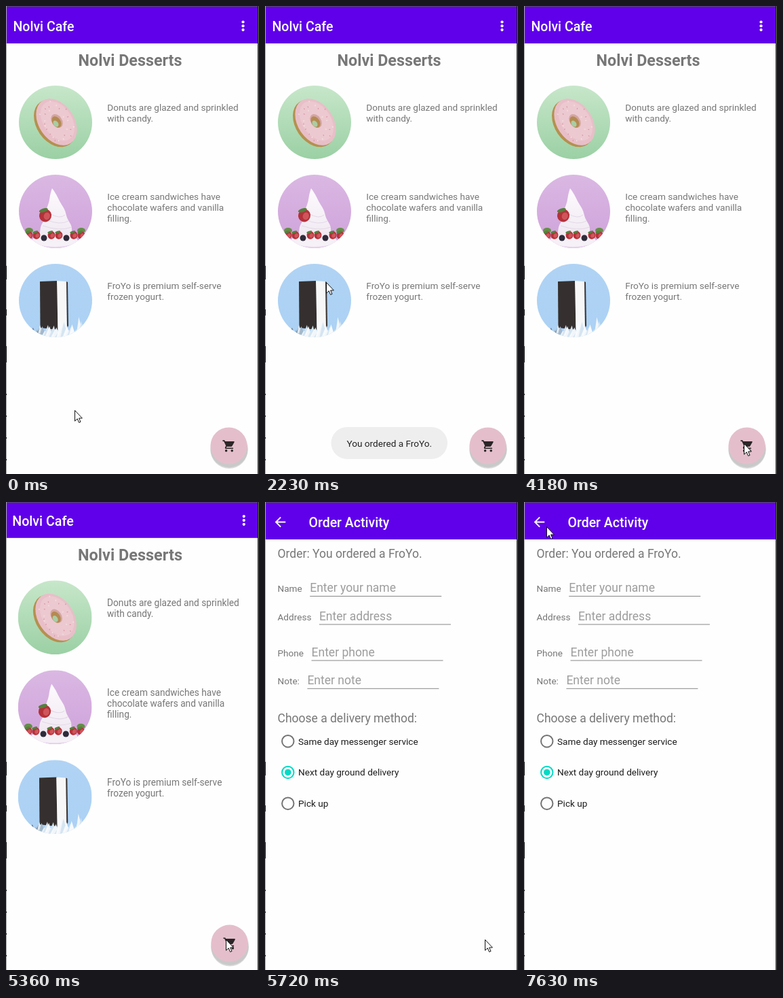
Recreate the animation shown at these times as an HTML page with a canvas. Size 373 by 688 pixels, loop 8000 ms.

```html
<!DOCTYPE html>
<html lang="en">
<head>
<meta charset="utf-8">
<title>Dessert order</title>
<style>
  html, body { margin: 0; width: 373px; height: 688px; overflow: hidden; background: #fefefe; }
  canvas { display: block; width: 373px; height: 688px; }
</style>
</head>
<body>
<canvas id="stage"></canvas>
<script>
const W = 373, H = 688, LOOP = 8000;
const PURPLE = '#6000ea', PAPER = '#fefefe', GREY = '#777', HINT = '#9d9d9d', TEAL = '#03dac5';
const SMALL = 13.6, MEDIUM = 17.5, LARGE = 19.5;
const ROW = 131;

const canvas = document.getElementById('stage');
const ctx = canvas.getContext('2d');
const ratio = window.devicePixelRatio || 1;
canvas.width = W * ratio;
canvas.height = H * ratio;

const cart = new Path2D('M7 18c-1.1 0-1.99.9-1.99 2S5.9 22 7 22s2-.9 2-2-.9-2-2-2zM1 2v2h2l3.6 7.59-1.35 2.45c-.16.28-.25.61-.25.96 0 1.1.9 2 2 2h12v-2H7.42c-.14 0-.25-.11-.25-.25l.03-.12.9-1.63h7.45c.75 0 1.41-.41 1.75-1.03l3.58-6.49A1 1 0 0 0 20 4H5.21l-.94-2H1zm16 16c-1.1 0-1.99.9-1.99 2s.89 2 1.99 2 2-.9 2-2-.9-2-2-2z');
const backArrow = new Path2D('M20 11H7.83l5.59-5.59L12 4l-8 8 8 8 1.41-1.41L7.83 13H20v-2z');
const pointer = new Path2D('M.5.5V16.2L4.2 12.8 6.6 18.4 9 17.4 6.6 12H11.4Z');

const linear = p => p;
const easeIn = p => p ** 1.73;
const easeOut = p => 1 - (1 - p) ** 2.5;

// The pointer glides to each place in a few visible hops.
const pointerMoves = [
  { start: 820, end: 1090, hops: 3, x: 90, y: 406, ease: easeIn },
  { start: 2490, x: 93, y: 409 },
  { start: 2640, end: 3070, hops: 4, x: 324, y: 643, ease: easeOut },
  { start: 6530, x: 218, y: 468 },
  { start: 7050, x: 31, y: 17 },
  { start: 7180, x: 34, y: 41 },
  { start: 7330, end: 7630, hops: 3, x: 33, y: 36 }
];

// Rises from 0 to 1 in equal hops, the first at start and the last at end.
function progress(t, start, end, hops) {
  if (t < start) return 0;
  if (hops === 1) return 1;
  const hop = 1 + Math.floor((t - start) / (end - start) * (hops - 1) + .1);
  return Math.min(1, hop / hops);
}

function pointerAt(t) {
  let x = 101, y = 594;
  for (const m of pointerMoves) {
    const p = (m.ease || linear)(progress(t, m.start, m.end, m.hops || 1));
    x += (m.x - x) * p;
    y += (m.y - y) * p;
  }
  return [Math.round(x), Math.round(y)];
}

function random(seed) {
  const v = Math.sin(seed * 12.9898) * 43758.5453;
  return v - Math.floor(v);
}

function rect(x, y, w, h, color) {
  ctx.fillStyle = color;
  ctx.fillRect(x, y, w, h);
}

function ellipse(x, y, rx, ry, color, turn = 0) {
  ctx.fillStyle = color;
  ctx.beginPath();
  ctx.ellipse(x, y, rx, ry, turn, 0, Math.PI * 2);
  ctx.fill();
}

function disc(x, y, r, color) {
  ellipse(x, y, r, r, color);
}

function poly(color, ...points) {
  ctx.fillStyle = color;
  ctx.beginPath();
  for (let i = 0; i < points.length; i += 2) ctx.lineTo(points[i], points[i + 1]);
  ctx.fill();
}

function text(str, x, y, size = SMALL, color = GREY, weight = 400, align = 'left') {
  ctx.font = `${weight} ${size}px Roboto, sans-serif`;
  ctx.textAlign = align;
  ctx.fillStyle = color;
  ctx.fillText(str, x, y);
}

function icon(path, x, y, size, color) {
  ctx.save();
  ctx.translate(x, y);
  ctx.scale(size / 24, size / 24);
  ctx.translate(-12, -12);
  ctx.fillStyle = color;
  ctx.fill(path);
  ctx.restore();
}

function vertical(y0, y1, from, to) {
  const fill = ctx.createLinearGradient(0, y0, 0, y1);
  fill.addColorStop(0, from);
  fill.addColorStop(1, to);
  return fill;
}

// Paints inside a disc of radius 54 whose centre is the new origin.
function roundPicture(y, top, bottom, paint) {
  ctx.save();
  ctx.translate(73, y);
  ctx.beginPath();
  ctx.arc(0, 0, 54, 0, Math.PI * 2);
  ctx.clip();
  rect(-54, -54, 108, 108, vertical(-54, 54, top, bottom));
  paint();
  ctx.restore();
}

function donut() {
  const tilt = -.6;
  ellipse(-1, 1.5, 27, 38, '#b5904f', tilt);
  ellipse(1.5, -.5, 26, 37.5, '#e8bfc8', tilt);
  ellipse(3, -2, 21, 32, '#ecc9d0', tilt);
  ctx.save();
  ctx.rotate(tilt);
  for (let i = 0; i < 26; i++) {
    const a = i * 2.4, r = .5 + random(i) * .4;
    ellipse(1 + Math.cos(a) * 26 * r, Math.sin(a) * 37 * r, 1.2, .7, i % 2 ? '#dc9aa8' : '#f5e2e3', a);
  }
  ctx.restore();
  ellipse(2, -2, 7.5, 11, '#d3a5a2', tilt);
  ellipse(1.5, -.5, 6, 9, '#b58a52', tilt);
  ellipse(.5, 2, 3.5, 5, '#a9cda3', tilt);
}

function strawberry(x, y, r) {
  ellipse(x, y, r, r * 1.05, '#b5313a', .3);
  ellipse(x + r * .25, y + r * .1, r * .5, r * .6, '#cf555b', .3);
  ellipse(x - r * .3, y - r * .85, r * .75, r * .3, '#557f3d', -.3);
}

// Whipped swirl: a cone that widens downwards with a slight ripple.
function swirl() {
  const edge = (u, side) => {
    const half = 29 * u ** .9 + Math.sin(u * 20) * 1.5 * u;
    ctx.lineTo(-5 + 6 * Math.sin(u * 2.4) + side * half, -34 + 78 * u);
  };
  ctx.beginPath();
  for (let u = 0; u <= 1; u += .04) edge(u, -1);
  for (let u = 1; u >= 0; u -= .04) edge(u, 1);
  ctx.fillStyle = vertical(-34, 44, '#fdfafd', '#efe7f1');
  ctx.fill();
  ctx.strokeStyle = '#e2d8e6';
  for (let i = 0; i < 3; i++) {
    ctx.beginPath();
    ctx.moveTo(-9 - i * 5, 3 + i * 9);
    ctx.quadraticCurveTo(7, 12 + i * 9, 14 + i * 5, 5 + i * 9);
    ctx.stroke();
  }
}

function sundae() {
  swirl();
  rect(-54, 43, 108, 12, '#e6d3eb');
  ellipse(-1, 43, 34, 9, '#f6f0f7');
  strawberry(-15, 6, 9);
  for (let i = 0; i < 8; i++) {
    const x = -39 + i * 11;
    if (i % 7 < 1) ellipse(x, 28, 6, 4, '#648e48');
    if (i === 2 || i === 5) disc(x, 39, 4.5, '#302b3a');
    else strawberry(x, 35, 5.5);
  }
}

function sandwich() {
  poly('#35302f', -23, -28, 3, -29, 3.5, 43, -22.5, 40);
  poly('#f7f7f8', 2, -29, 16, -28, 17, 41, 3.5, 43);
  poly('#3d3532', 16, -28, 18, -27, 19, 37, 17, 41);
  // Crushed ice, higher at the right.
  for (let i = 0; i < 30; i++) {
    const x = -42 + i * 2.9;
    const peak = 46 - random(i + 3) * (x > 5 ? 22 : 10);
    const left = x < -18;
    const shades = left ? ['#5d7185', '#dfe8f0', '#a3b9cc'] : ['#f1f6fa', '#d5e5f2', '#f8fafc'];
    poly(shades[i % 3], x - 6, 55, x - 2 + random(i) * 4, peak, x + 6, 55);
  }
}

function toolbar() {
  rect(0, 0, W, H, PAPER);
  rect(-4, -4, W + 8, 59, PURPLE);
}

const desserts = [
  { lines: ['Donuts are glazed and sprinkled', 'with candy.'], top: '#c7e7ca', bottom: '#9bd0a4', paint: donut },
  { lines: ['Ice cream sandwiches have', 'chocolate wafers and vanilla', 'filling.'], top: '#dab8e3', bottom: '#cfa2da', paint: sundae },
  { lines: ['FroYo is premium self-serve', 'frozen yogurt.'], top: '#b0d3f4', bottom: '#abd1f4', paint: sandwich }
];

function menuScreen(press) {
  toolbar();
  text('Nolvi Cafe', 10.5, 37, LARGE, '#fff', 500);
  for (let i = -1; i <= 1; i++) disc(349.5, 29.3 + i * 5.8, 2.1, '#fff');
  text('Nolvi Desserts', 183, 88, 23.3, GREY, 700, 'center');

  desserts.forEach(({ lines, top, bottom, paint }, row) => {
    roundPicture(171 + row * ROW, top, bottom, paint);
    lines.forEach((line, i) => text(line, 149.3, 154 + row * ROW + i * 16));
  });

  disc(329, 650.5, 28, 'rgba(0,0,0,.08)');
  disc(329, 652.5, 27.5, 'rgba(0,0,0,.14)');
  disc(328.5, 646.5, 27, '#e4bfcb');
  icon(cart, 328.9, 646.8, 20.7, '#2b2528');
  if (press) disc(328.5, 646.5, 27, `rgba(0,0,0,${press})`);
}

function field(label, hint, y) {
  text(label, 18.5, y);
  const x = 30 + ctx.measureText(label).width;
  text(hint, x, y, MEDIUM, HINT);
  rect(x, y + 6, 194, 1, '#888');
}

function radio(label, y, on) {
  ctx.strokeStyle = on ? TEAL : '#747474';
  ctx.lineWidth = 2;
  ctx.beginPath();
  ctx.arc(33.8, y, 8.7, 0, Math.PI * 2);
  ctx.stroke();
  if (on) disc(33.8, y, 4.8, TEAL);
  text(label, 49, y + 5, SMALL, '#1d1d1d');
}

function orderScreen() {
  toolbar();
  icon(backArrow, 22.5, 29.5, 23.3, '#fff');
  text('Order Activity', 64.5, 37, LARGE, '#fff', 500);
  text('Order: You ordered a FroYo.', 18.5, 82, MEDIUM);
  field('Name', 'Enter your name', 132);
  field('Address', 'Enter address', 173.5);
  field('Phone', 'Enter phone', 226.5);
  field('Note:', 'Enter note', 267.8);
  text('Choose a delivery method:', 18.5, 324, MEDIUM);
  ['Same day messenger service', 'Next day ground delivery', 'Pick up']
    .forEach((label, i) => radio(label, 351.7 + i * 45.75, i === 1));
}

function zoomed(scale, paint) {
  ctx.save();
  ctx.translate(186, 344);
  ctx.scale(scale, scale);
  ctx.translate(-186, -344);
  ctx.beginPath();
  ctx.rect(1, 0, 370, H);
  ctx.clip();
  paint();
  ctx.restore();
}

function toast(alpha) {
  if (alpha <= 0) return;
  ctx.save();
  ctx.globalAlpha = alpha;
  ctx.fillStyle = '#eee';
  ctx.beginPath();
  ctx.roundRect(97.5, 619, 171.5, 47, 23.5);
  ctx.fill();
  text('You ordered a FroYo.', 120.5, 648, SMALL, '#222');
  ctx.restore();
}

// Slivers of the desktop around the phone window.
function windowEdges() {
  rect(0, 0, W, 1, '#55505c');
  rect(371, 0, 1, H, '#111');
  rect(372, 0, 1, H, '#666');
  rect(0, 0, 1, H, '#a9a9a9');
  rect(0, 382, 1, 20, '#111');
  rect(0, 446, 1, 9, '#111');
  rect(0, 500, 1, 24, '#111');
  for (let y = 570; y < H; y += 32) rect(0, y, 1, 2, '#111');
}

function draw(t) {
  const open = progress(t, 5360, 5720, 4);
  const fade = progress(t, 3780, 4180, 4);
  const press = t < 3660 ? 0 : .25 * (1 - fade);
  ctx.setTransform(ratio, 0, 0, ratio, 0, 0);

  // The old screen grows while the new one settles over it.
  zoomed(1 + .12 * open ** 2, () => menuScreen(press));
  if (open >= .5) {
    rect(0, 0, W, H, 'rgba(0,0,0,.35)');
    rect(0, 680, W, 8, '#000');
    zoomed(1 - .046 * (1 - open) ** 2, orderScreen);
  }
  toast(progress(t, 1810, 2230, 4) - fade);
  windowEdges();

  const away = t >= 6650 && t < 7050;
  if (away) return;
  ctx.translate(...pointerAt(t));
  ctx.fillStyle = '#fff';
  ctx.fill(pointer);
  ctx.strokeStyle = '#111';
  ctx.lineWidth = 1;
  ctx.stroke(pointer);
}

const start = performance.now();
function tick() {
  draw((performance.now() - start) % LOOP);
  requestAnimationFrame(tick);
}
tick();
</script>
</body>
</html>
```
